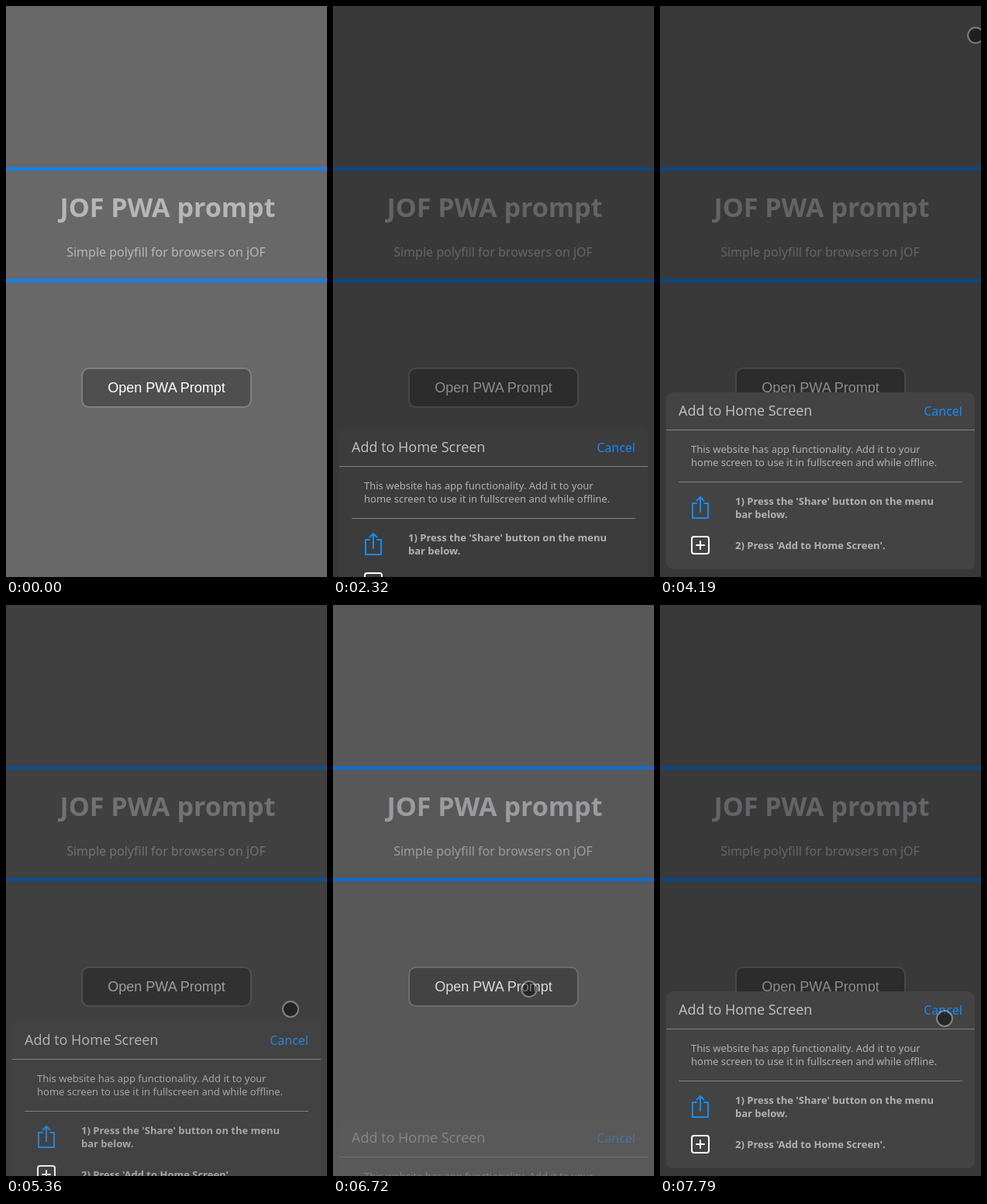
Recreate the animation shown at these times as an HTML page. Size 414 by 736 pixels, loop 8 s.

```html
<!DOCTYPE html>
<html lang="en">
<head>
<meta charset="utf-8">
<title>PWA prompt</title>
<style>
  html, body { margin: 0; height: 100%; overflow: hidden; background: #686868; }
  svg { display: block; width: 414px; height: 736px; font-family: "Noto Sans", sans-serif; }
  .button-label { font: 18px "Liberation Sans", Arial, sans-serif; fill: #fff; }
  .sheet-title { font: 500 18px "Open Sans", "Noto Sans", sans-serif; fill: #c3c3c5; }
  .small { font-size: 13px; fill: #b2b2b4; }
  .bold { font-weight: 700; }
  .icon { fill: none; stroke-width: 2; stroke-linecap: round; stroke-linejoin: round; }
</style>
</head>
<body>
<svg viewBox="0 0 414 736">
  <rect width="414" height="736" fill="#686868"/>
  <path d="M0 210H414M0 354H414" stroke="#1480ec" stroke-width="4.5"/>
  <text class="bold" x="347.4" y="272" text-anchor="end" font-size="34" fill="#b6b6ba">JOF PWA prompt</text>
  <text x="78.2" y="323" font-size="16" fill="#b8b8bb">Simple polyfill for browsers on jOF</text>
  <rect x="98" y="467" width="218" height="50" rx="9" fill="#4f4f4f" stroke="#808080" stroke-width="2"/>
  <text class="button-label" x="207" y="498" text-anchor="middle">Open PWA Prompt</text>

  <g id="overlay">
    <rect width="414" height="736" opacity=".45"/>
    <g id="sheet">
      <rect id="panel" x="8" y="498" width="398" height="228" rx="9"/>
      <text class="sheet-title" x="24" y="528">Add to Home Screen</text>
      <text x="390" y="528" font-size="16" text-anchor="end" fill="#168bf6">Cancel</text>
      <path d="M8 546.5H406M24 613.5H390" stroke="#838383"/>
      <g class="small">
        <text x="40" y="576">This website has app functionality. Add it to your</text>
        <text x="40" y="593">home screen to use it in fullscreen and while offline.</text>
      </g>
      <g class="small bold">
        <text x="97" y="643">1) Press the 'Share' button on the menu</text>
        <text x="97" y="660">bar below.</text>
        <text x="97" y="700">2) Press 'Add to Home Screen'.</text>
      </g>
      <path class="icon" stroke="#168bf6" d="M47 641H42V660H62V641H57M52 652V633M47.5 637.5L52 633L56.5 637.5"/>
      <g class="icon" stroke="#fff">
        <rect x="41" y="684" width="22" height="22" rx="3"/>
        <path d="M47 695H57M52 690V700"/>
      </g>
    </g>
  </g>

  <g id="cursor">
    <circle r="9" fill="#000" fill-opacity=".43"/>
    <circle r="10" fill="none" stroke="#fff" stroke-opacity=".34" stroke-width="2"/>
  </g>
</svg>
<script>
  const LOOP = 8000, TRAVEL = 238, SLIDE = 400, FADE = 200;
  const toggles = [
    { at: 2110, open: true },
    { at: 5294, open: false },
    { at: 6620, open: true },
  ];
  // Each move eases to a point; bow bends its path sideways or up.
  const cursorHome = { x: 430, y: -40 };
  const cursorMoves = [
    { start: 4100, end: 4280, x: 385, y: 113 },
    { start: 4690, end: 5070, x: 370, y: 537, bowX: 27 },
    { start: 5070, end: 5170, x: 367, y: 521 },
    { start: 5730, end: 6050, x: 227, y: 495, bowY: -13 },
    { start: 6050, end: 6330, x: 253, y: 495 },
    { start: 7200, end: 7510, x: 377, y: 511 },
    { start: 7510, end: 7600, x: 367, y: 533 },
  ];

  const byId = id => document.getElementById(id);
  const overlay = byId('overlay'), sheet = byId('sheet');
  const panel = byId('panel'), cursor = byId('cursor');
  const clamp = v => Math.min(1, Math.max(0, v));
  const smooth = k => k * k * (3 - 2 * k);

  function bezier(x1, y1, x2, y2) {
    const curve = (a, b, u) => 3 * a * u * (1 - u) ** 2 + 3 * b * u * u * (1 - u) + u ** 3;
    return x => {
      let low = 0, high = 1;
      for (let i = 0; i < 24; i++) {
        const mid = (low + high) / 2;
        if (curve(x1, x2, mid) < x) low = mid; else high = mid;
      }
      return curve(y1, y2, high);
    };
  }
  const slide = bezier(.4, .24, .3, 1);
  const fade = bezier(.42, 0, 1, 1);

  function cursorAt(t) {
    let { x, y } = cursorHome;
    for (const { start, end, x: toX, y: toY, bowX = 0, bowY = 0 } of cursorMoves) {
      const k = clamp((t - start) / (end - start));
      const bend = Math.sin(Math.PI * k);
      x += (toX - x) * smooth(k) + bowX * bend;
      y += (toY - y) * smooth(k) + bowY * bend;
    }
    return [x, y];
  }

  function draw(t) {
    const last = toggles.filter(toggle => toggle.at <= t).pop() || { at: -LOOP, open: false };
    const elapsed = t - last.at;
    const shown = p => last.open ? p : 1 - p;
    const position = shown(slide(clamp(elapsed / SLIDE)));
    const settled = last.open && elapsed >= 450;

    overlay.setAttribute('opacity', shown(fade(clamp(elapsed / FADE))));
    sheet.setAttribute('transform', `translate(0 ${Math.round(TRAVEL * (1 - position))})`);
    panel.setAttribute('fill', settled ? '#434343' : '#3c3c3c');
    cursor.setAttribute('transform', `translate(${cursorAt(t)})`);
  }

  const start = performance.now();
  function tick() {
    draw((performance.now() - start) % LOOP);
    requestAnimationFrame(tick);
  }
  tick();
</script>
</body>
</html>
```
